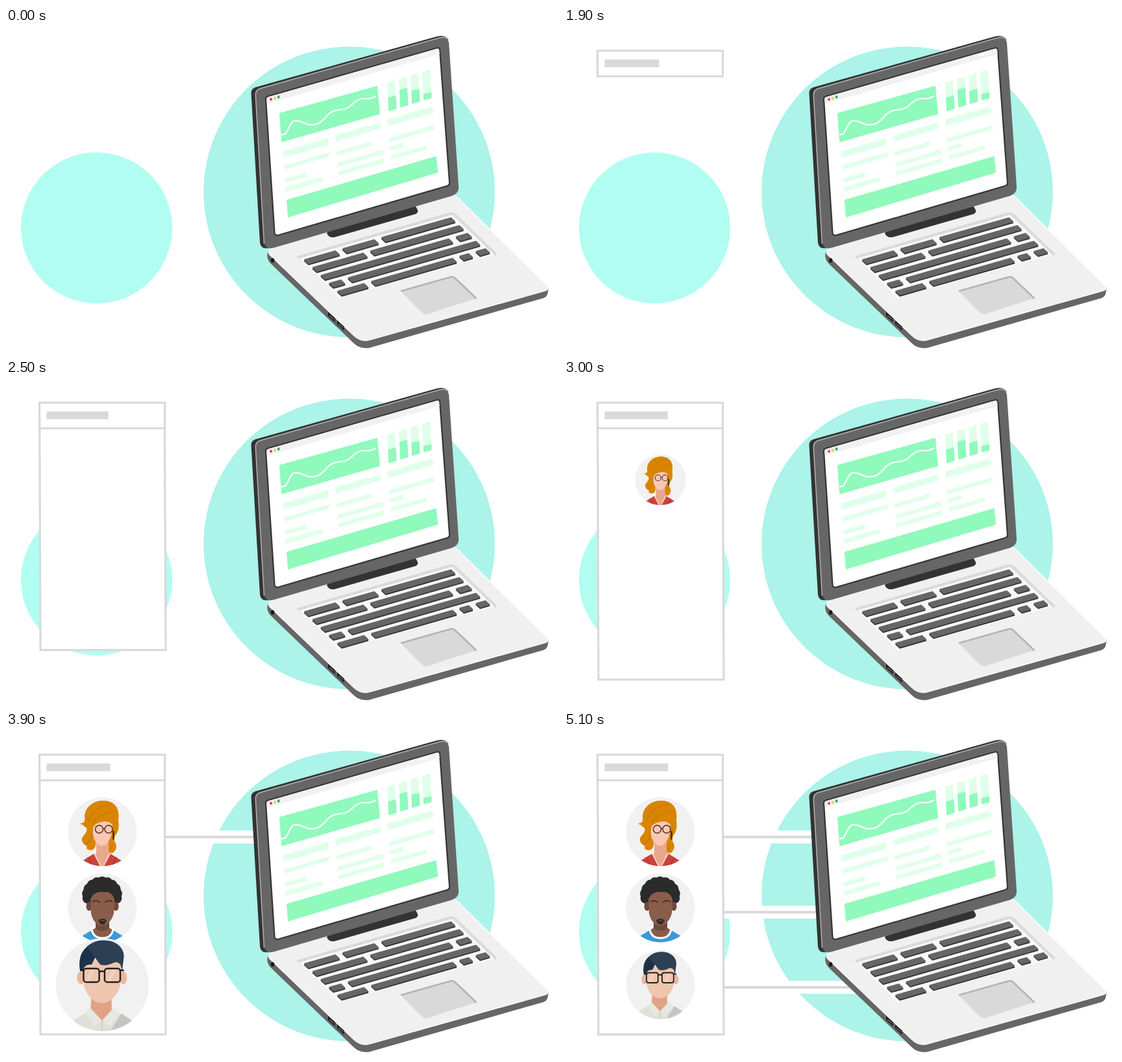
Write an HTML page that moves like this. It is 850 px wide and 500 px high and loops after 8000 ms.

```html
<!DOCTYPE html>
<html lang="en">
<head>
<meta charset="utf-8">
<title>Team connected to a laptop</title>
<style>
  html, body { margin: 0; width: 100%; height: 100%; overflow: hidden; background: #fff; }
  svg { display: block; width: 850px; height: 500px; }
  .frame { fill: #fff; stroke: #d9d9d9; stroke-width: 3.2; }
  .band { stroke: #fff; stroke-width: 20; }
  .wire { stroke: #d9d9d9; stroke-width: 4; }
  .round { stroke-linejoin: round; stroke-width: 2; }
</style>
</head>
<body>
<svg viewBox="0 0 850 500" fill="none">
  <defs>
    <clipPath id="clip1"><circle cx="148.5" cy="154" r="53"/></clipPath>
    <clipPath id="clip2"><circle cx="148.5" cy="271.5" r="53"/></clipPath>
    <clipPath id="clip3"><circle cx="148.5" cy="390" r="53"/></clipPath>
  </defs>

  <circle cx="528.5" cy="253" r="224.3" fill="#acf3e9"/>
  <circle cx="139.5" cy="308.5" r="116.5" fill="#b2fdf1"/>
  <g id="wires"></g>

  <!-- laptop base -->
  <path fill="#666" d="M404 344Q401 350 403 356Q404 360 408 364L535 486Q545 496 560 493.5L827 417Q833 415 834 410L835.5 401L690 300Z"/>
  <path fill="#f0f0f0" stroke="#fff" stroke-width="1.2" d="M406 343Q402 345 406 350L535 474Q546 485 560 481.5L829 406Q838 403 833 397.5L703 269Q695 258 683 255L420 332Z"/>
  <ellipse cx="410.5" cy="358.5" rx="2.8" ry="3.6" fill="#1a1a1a"/>
  <g id="ports"></g>
  <path fill="#f8f8f8" d="M453 355L686 289L752 350L512 416Z"/>
  <path stroke="#d9d9d9" stroke-width="4" d="M449 354L681 287.5Q688 285 692 289L755 350"/>
  <g id="keys" class="round"></g>
  <path fill="#d9d9d9" d="M607.5 406L685 384Q689 382.5 692 386L725 417L650 441Q644 443 640 439Z"/>
  <path stroke="#b3b3b3" stroke-width="2.6" d="M608 406L684 384.5Q688.5 383 691.5 386L724.5 417.5"/>

  <!-- laptop lid -->
  <path fill="#333" d="M494 317L500 305L628 270L634 281Q635 285 631 287L507 322.5Q498 325 494 317Z"/>
  <path fill="#333" d="M377.5 101Q377 94 384 91.5L662 13.5Q676 10 681 17L600 200L403 340Q392 341 391 331Z"/>
  <path fill="#666" d="M384 104Q383.5 96 391 93.5L668 15.5Q681 12 682 23L697 245Q697.5 255 687 259L411 339.5Q399 342 398 331Z"/>
  <path stroke="#b3b3b3" stroke-width="1.5" d="M397.5 333L384.3 104Q384 96 391 93.5L668 15Q677 13 680 17"/>
  <path fill="#fff" stroke="#333" stroke-width="2.2" stroke-linejoin="round" d="M400 110Q399.5 107 403 105.5L663 31Q667.5 29.5 668 34L683 239Q683 242 680 243.5L420 319.5Q414 321 413.5 316Z"/>
  <path fill="#f1f1f1" d="M401.5 109Q401.5 107.5 404 106.5L663 32Q667 31 667.2 35L667.6 40L402 117Z"/>
  <ellipse cx="408" cy="110" rx="1.8" ry="2.2" fill="#ed3b35"/>
  <ellipse cx="414" cy="108.2" rx="1.8" ry="2.2" fill="#f6c945"/>
  <ellipse cx="419.7" cy="106.5" rx="1.8" ry="2.2" fill="#1b9e77"/>
  <path stroke="#fff" stroke-width="2.6" stroke-linecap="round" d="M640 42.5L646 40.7M651 39.7h.5M656.5 38h.5M662 36.5h.5"/>
  <g id="report" class="round"></g>
  <path stroke="#fff" stroke-width="2.2" stroke-linecap="round" d="M424.500 164C435 168 435 143 446 143S461 150 470 149.5S484 147 490 140S502 127 511 126.5S526 125 534 117S549 108 556 109S564 107 569 105.5"/>

  <!-- people panel -->
  <path id="panel" class="frame"/>
  <path id="head" class="frame"/>
  <rect id="title" x="62.5" y="48.5" height="12" fill="#d9d9d9"/>

  <g class="person" data-cy="154">
    <circle cx="148.5" cy="154" r="53" fill="#f1f1f1"/>
    <g clip-path="url(#clip1)">
      <path fill="#d98500" d="M150 106C163 106 173 115 173 126C171 133 175 140 173 150C171 159 165 161 167 168C172 176 170 183 164 187C158 187 155 183 155 176L138 170C139 179 134 184 128 182C124 181 123 179 125 176C118 174 115 166 118 162C122 157 127 152 123 146C120 143 117 144 114 141C121 141 122 137 121 131C121 118 133 106 150 106Z"/>
      <path fill="#e9a78e" d="M139 168H158V184L166 196L148 210L131 196L139 187Z"/>
      <path fill="#f9c8b5" d="M133 140C133 157 134 165 139 170Q148 181 157 170C163 163 164 150 164 136L150 128Z"/>
      <path fill="#fbd7ca" d="M137 188L147 207H143L131 192ZM158 188L150 207H154L164 192Z"/>
      <path fill="#c9433a" d="M114 201L135 188L146 209H114ZM182 201L161 188L150 209H182Z"/>
      <path stroke="#ad352f" stroke-width="1.5" d="M126 193L133 207M170 193L163 207"/>
      <g stroke="#4a2c17" stroke-width="1.4">
        <circle cx="143.500" cy="150" r="6"/><circle cx="158" cy="150" r="6"/><path d="M149.500 149h2.500"/>
      </g>
      <path fill="#d98500" d="M150 106C131 106 120 119 122 133Q123 141 119 145C127 148 125 154 130 158Q135 155 134 149C135 142 143 139 153 138Q161 138 165 145L167 152L173 147C171 139 175 133 173 125C172 113 163 106 150 106Z"/>
      <path stroke="#c17400" stroke-width="1.2" d="M127 139C130 125 141 113 162 112M134 141C140 130 151 124 170 123M123 173C129 169 135 164 132 153M159 181Q165 180 163 173"/>
      <path stroke="#3b2a20" stroke-width="2.4" d="M165.5 153V166"/>
    </g>
  </g>

  <g class="person" data-cy="271.5">
    <circle cx="148.5" cy="271.5" r="53" fill="#f1f1f1"/>
    <g clip-path="url(#clip2)">
      <path fill="#3a99d9" d="M112 318L135 304H162L185 318V327H112Z"/>
      <path fill="#8a5d4a" stroke="#fff" stroke-width="3" d="M132 304Q134 318 148.500 318Q163 318 165 304L158 300H139Z"/>
      <path fill="#70493a" d="M138 288H159V303Q150 311 138 303Z"/>
      <g id="curls" fill="#2b2b2b"></g>
      <ellipse cx="128" cy="269" rx="4.5" ry="7" fill="#70493a"/>
      <ellipse cx="169" cy="269" rx="4.5" ry="7" fill="#70493a"/>
      <path fill="#8a5d4a" d="M130 259Q133 248 144 247H157Q166 251 167 259L166 280Q163 291 155 297Q148 301 141 297Q133 291 131 280Z"/>
      <path stroke="#2b2b2b" stroke-width="1.600" d="M133 262Q139 258 145 263M152 263Q158 258 164 262"/>
      <path fill="#2b2b2b" d="M141.5 294Q142 288 148.5 288Q155 288 155.5 294L153 292Q154 297 148.5 297Q143 297 144 292Z"/>
      <path stroke="#70493a" stroke-width="1.6" d="M145 291.5Q148.5 290 152 291.5"/>
    </g>
  </g>

  <g class="person" data-cy="390">
    <circle cx="148.5" cy="390" r="53" fill="#f1f1f1"/>
    <g clip-path="url(#clip3)">
      <path fill="#e0dfd9" d="M112 433L136 418H160L184 433V444H112Z"/>
      <path fill="#c5c4be" d="M170 423L184 432V444H157Z"/>
      <path fill="#e0a385" d="M136 400H159V419L148 432L135 419Z"/>
      <path fill="#e9e7e1" d="M134 416L148 431L140 438L129 423ZM162 416L148 431L157 438L168 423Z"/>
      <path stroke="#c5c4be" stroke-width=".8" d="M148 431V443"/>
      <ellipse cx="124" cy="382" rx="4.5" ry="7.5" fill="#eab79e"/>
      <ellipse cx="172" cy="382" rx="4.5" ry="7.5" fill="#eab79e"/>
      <path fill="#f0c5ae" d="M126 362H170L169 390Q166 403 156 409Q148 413 140 409Q130 403 127 390Z"/>
      <path fill="#f4d0be" d="M135 373H140L134 386H130ZM159 373H164L158 386H154Z"/>
      <path fill="#2d4053" d="M123 374C120 352 133 341 146 339.500C162 338 173 346 173 358L171 374L169 367Q165 362 159 366Q152 369 146 367L140 359L136 367Q128 366 126 374Z"/>
      <path fill="#1b3348" d="M123 374C121 360 124 352 131 347Q136 354 140 359L136 367Q128 366 126 374Z"/>
      <g stroke="#202020" stroke-width="1.8">
        <rect x="127" y="371.5" width="17.8" height="15.500" rx="3"/>
        <rect x="151" y="371.5" width="17.8" height="15.500" rx="3"/>
        <path d="M145 375.5Q148 373.500 151 375.5M123 373.5h5M168 373.5h5"/>
      </g>
    </g>
  </g>
</svg>
<script>
const $ = id => document.getElementById(id);
const poly = (points, color) => `<path d="M${points.map(p => p.join(" ")).join("L")}Z" fill="${color}" stroke="${color}"/>`;
const GREEN = "#8ffabb", PALE = "#e0ffea";
const SLOPE = .287;

// Sloping strip with upright ends, centred on its axis
const strip = (x, y, w, h, color) => {
  const drop = SLOPE * w;
  return poly([[x, y - h / 2], [x + w - 1, y - drop - h / 2], [x + w, y - drop + h / 2], [x + 1, y + h / 2]], color);
};

function drawReport() {
  let out = poly([[422, 132], [571, 90.5], [575, 132], [425, 175]], GREEN);
  out += poly([[433, 266], [662, 199], [664, 222.5], [435, 291]], GREEN);

  [.55, .4, .57, .82].forEach((empty, i) => {
    const x = 588 + 18 * i, y = 85 - 5.5 * i;
    const bar = f => poly([[x + 2 * f, y + 42 * f], [x + 10 + 2.5 * f, y - 3 + 42 * f], [x + 12.5, y + 39], [x + 2, y + 42]], f ? GREEN : PALE);
    out += bar(0) + bar(empty);
  });

  // Each column: a heading, then three lines of these lengths
  [[69, 32, 54], [53, 69, 69], [69, 20, 55]].forEach((lines, c) => {
    const x = 427 + 80.5 * c, y = 195 - 24.5 * c;
    out += strip(x, y, 69, 8, PALE);
    lines.forEach((w, i) => {
      const dy = i ? 27 + 13.5 * i : 20 + 3.5 * c;
      out += strip(x + dy / 11, y + dy, w, 4.5, PALE);
    });
  });
  $("report").innerHTML = out;
}

function drawKeys() {
  const rows = [[55, 56, 114], [85, 144], [204, 25], [25, 204], [48, 132, 21, 22]];
  let out = "";
  rows.forEach((widths, r) => {
    let x = 460 + 12.8 * r, y = 358 + 12.1 * r;
    for (const w of widths) {
      const len = w - 8;
      const cap = d => [[x, y + d], [x + len, y - SLOPE * len + d], [x + len + 6, y - SLOPE * len + 5.5 + d], [x + 6, y + 5.5 + d]];
      out += poly(cap(1.6), "#333") + poly(cap(-.3), "#666");
      x += w + 4;
      y -= SLOPE * (w + 4);
    }
  });
  $("keys").innerHTML = out;
}

function drawPorts() {
  $("ports").innerHTML = [0, 1].map(i => `<g transform="translate(${496 + 14 * i} ${438.5 + 13 * i})">
    <path fill="#1a1a1a" d="M0 0L10.5 9V15.5L0 6Z"/><path stroke="#777" stroke-width="1.4" d="M2 5l7 6"/></g>`).join("");
}

function drawCurls() {
  let out = `<ellipse cx="148" cy="250" rx="24" ry="20"/>`;
  for (let i = 0; i <= 10; i++) {
    const a = Math.PI * (1.08 - 1.16 * i / 10);
    out += `<circle cx="${148 + 22.5 * Math.cos(a)}" cy="${251.5 - 20 * Math.sin(a)}" r="8.5"/>`;
  }
  $("curls").innerHTML = out;
}

const clamp = v => Math.min(1, Math.max(0, v));
const smooth = v => { v = clamp(v); return v * v * (3 - 2 * v); };
const settle = (age, tau) => age > 0 ? 1 - Math.exp(-age / tau) : 0;
// Grow past full size, then drop back
const pop = age => age <= 500 ? 1.35 * ((age + 10) / 510) ** 1.2 : 1 + .35 * Math.exp((500 - age) / 50);

const people = [...document.querySelectorAll(".person")];
$("wires").innerHTML = `<g><path class="band"/><path class="wire"/></g>`.repeat(3);
const wires = [...$("wires").children];
const show = (el, on) => { el.style.display = on ? "" : "none"; };

function render(t) {
  const right = 51.5 + 193 * smooth((t - 446) / 1187);
  show($("head"), t >= 500);
  $("head").setAttribute("d", `M51.5 35H${right}V74.5H51.8Z`);
  $("title").setAttribute("width", 98 * settle(t - 1159, 381));

  const grown = settle(t - 2076, 206);
  show($("panel"), grown > 0);
  $("panel").setAttribute("d", `M51.8 74.5L53 ${74.5 + 392.3 * grown}H246L244.3 74.5Z`);

  people.forEach((el, i) => {
    const age = t - 2700 - 350 * i, cy = +el.dataset.cy;
    show(el, age >= 0);
    if (age >= 0) el.setAttribute("transform", `translate(148.5 ${cy}) scale(${pop(age)}) translate(-148.5 ${-cy})`);
  });

  wires.forEach((g, i) => {
    const k = smooth((t - 3400 - 600 * i) / 500);
    show(g, k > 0);
    for (const line of g.children) line.setAttribute("d", `M246 ${162 + 116 * i}H${246 + 214 * k}`);
  });
}

drawReport();
drawKeys();
drawPorts();
drawCurls();

const LOOP = 8000, STEP = 100;
const begin = performance.now();
function tick() {
  const t = (performance.now() - begin) % LOOP;
  render(Math.floor(t / STEP) * STEP);
  requestAnimationFrame(tick);
}
tick();
</script>
</body>
</html>
```
